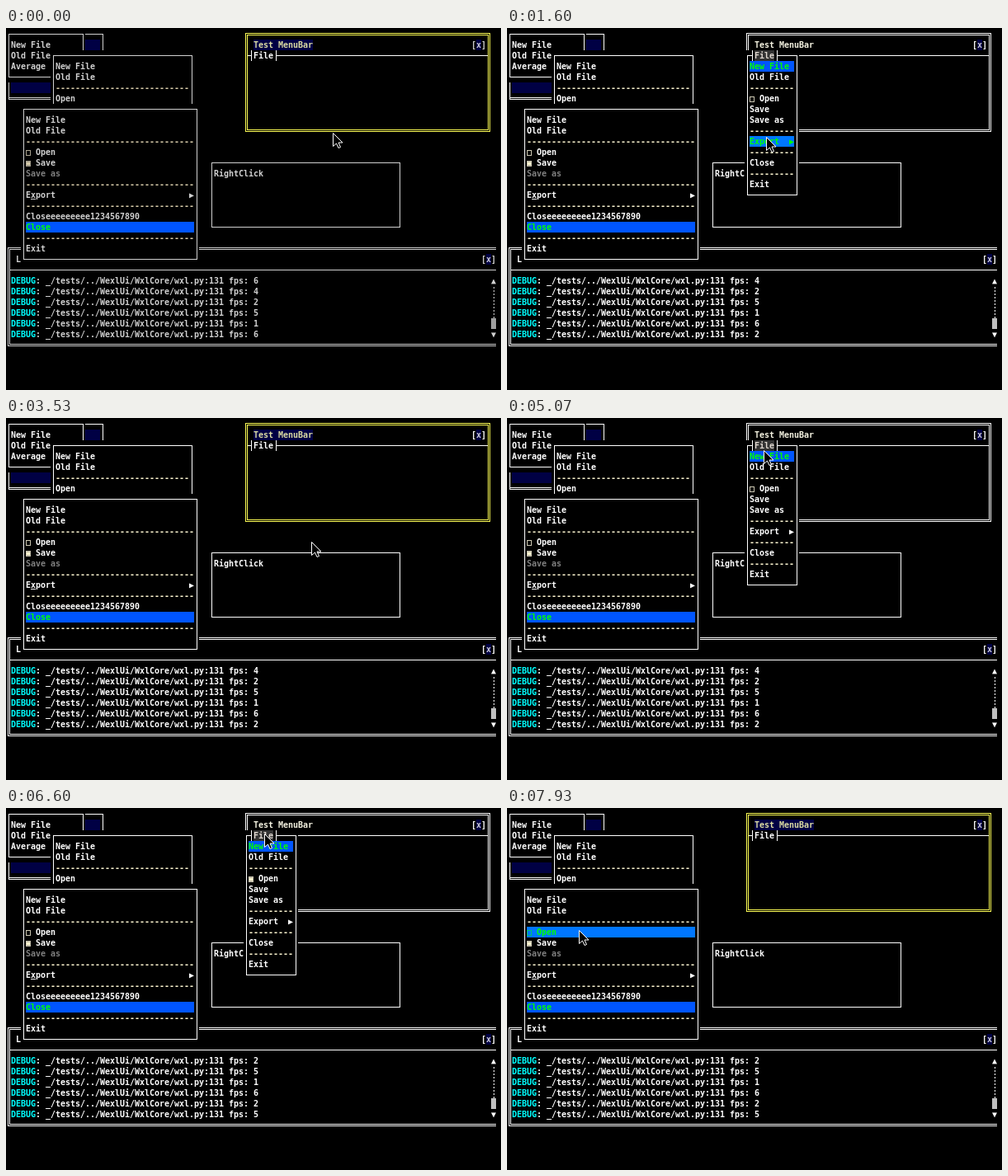
Write an HTML page with a canvas that moves like this. It is 600 by 439 pixels and loops after 8 s.

```html
<!DOCTYPE html>
<html lang="en">
<head>
<meta charset="utf-8">
<title>Terminal menus</title>
<style>
html, body { margin: 0; width: 100%; height: 100%; overflow: hidden; background: #000; }
canvas { display: block; }
</style>
</head>
<body>
<canvas id="stage" width="600" height="439"></canvas>
<script>
(() => {
const ctx = document.getElementById('stage').getContext('2d');
const LOOP = 8000, FPS = 15;
const COL = 6, ROW = 13;
const NAVY = '#000044', YELLOW = '#ffff55', GREEN = '#00ff00';
const SELECTED = '#0055ff', HOVERED = '#0077ff';
const FPS_LOG = [6, 4, 2, 5, 1, 6, 2, 5];

// Pointer stops: time, x, y
const PATH = [
  [0, 396, 127], [140, 396, 127], [870, 313, 33], [1270, 313, 33],
  [1600, 314, 132], [1740, 314, 132], [1800, 322, 136], [2070, 322, 136],
  [2400, 375, 150], [2530, 373, 157], [2670, 373, 157], [2930, 370, 150],
  [3810, 370, 150], [4530, 312, 34], [5005, 312, 34], [5070, 311, 39],
  [5270, 314, 81], [5810, 314, 81], [6070, 314, 48], [6270, 314, 48],
  [6400, 313, 31], [6605, 313, 31], [7000, 309, 82], [7270, 309, 82],
  [7730, 89, 148], [7870, 89, 148], [7930, 87, 148], [8000, 87, 148]
];

// Menu items: '-' is a divider, '>' a submenu, '!' disabled, '&' a shortcut letter
const LEFT_MENU = ['New File', 'Old File', '-', '□ Open', '▣ Save', '!Save as', '-',
  'E&xport>', '-', 'Closeeeeeeeee1234567890', 'Close', '-', 'Exit'];
const fileMenu = checked => ['New File', 'Old File', '-', (checked ? '▣' : '□') + ' Open',
  'Save', 'Save as', '-', 'Export>', '-', 'Close', '-', 'Exit'];
const SUB_MENU = ['t&xt>', '&json', '&yaml'];

let ink, dash, pointer;

const rowTop = r => 1 + r * ROW;
const midX = c => c * COL + 3;
const midY = r => r * ROW + 7;

function rect(x, y, w, h, color) {
  ctx.fillStyle = color;
  ctx.fillRect(x, y, w, h);
}
const cells = (c, r, w, h, color) => rect(c * COL, rowTop(r), w * COL, h * ROW, color);
const hLine = (x0, x1, y, color = ink) => rect(x0, y, x1 - x0 + 1, 1, color);
const vLine = (x, y0, y1, color = ink) => rect(x, y0, 1, y1 - y0 + 1, color);

function text(str, c, r, color = ink) {
  ctx.fillStyle = color;
  [...str].forEach((ch, i) => {
    if (ch !== ' ') ctx.fillText(ch, (c + i) * COL, rowTop(r) + 10);
  });
}

function frame(x0, y0, x1, y1, color = ink) {
  hLine(x0, x1, y0, color);
  hLine(x0, x1, y1, color);
  vLine(x0, y0, y1, color);
  vLine(x1, y0, y1, color);
}

function box(c0, r0, c1, r1, color = ink, double = false) {
  cells(c0, r0, c1 - c0 + 1, r1 - r0 + 1, '#000');
  const [x0, y0, x1, y1] = [midX(c0), midY(r0), midX(c1), midY(r1)];
  if (!double) return frame(x0, y0, x1, y1, color);
  frame(x0 - 1, y0 - 1, x1 + 1, y1 + 1, color);
  frame(x0 + 1, y0 + 1, x1 - 1, y1 - 1, color);
}

function closeButton(c, r) {
  text('[ ]', c, r);
  cells(c + 1, r, 1, 1, NAVY);
  text('x', c + 1, r, '#c8c8d8');
}

function pointerOver(c, r, w) {
  const x = pointer.x - c * COL, y = pointer.y - rowTop(r);
  return x >= 0 && x < w * COL && y >= 0 && y < ROW;
}

function menu(c0, r0, c1, items, selected, canHover = true) {
  box(c0, r0, c1, r0 + items.length + 1);
  const c = c0 + 1, w = c1 - c0 - 1;
  items.forEach((item, i) => {
    const r = r0 + 1 + i;
    if (item === '-') return text('-'.repeat(w), c, r, dash);
    const disabled = item[0] === '!';
    const key = item.indexOf('&');
    const label = item.replace(/[!&>]/g, '');
    const hover = canHover && !disabled && pointerOver(c, r, w);
    const lit = hover || i === selected;
    if (lit) cells(c, r, w, 1, i === selected ? SELECTED : HOVERED);
    const color = disabled ? '#808080' : lit ? GREEN : ink;
    text(label, c, r, color);
    if (/^[□▣]/.test(label) && !lit) text(label[0], c, r, dash);
    if (item.endsWith('>')) text('▶', c1 - 1, r, color);
    if (key >= 0) {
      cells(c + key, r, 1, 1, '#000');
      text(label[key], c + key, r);
      hLine((c + key) * COL, (c + key) * COL + 5, rowTop(r) + 11);
    }
  });
}

function backWindows() {
  box(0, 0, 19, 6);
  cells(1, 1, 18, 1, NAVY);
  cells(1, 5, 18, 1, NAVY);
  hLine(3, 117, 84);
  hLine(3, 117, 86);
  rect(4, 85, 113, 1, '#000');

  box(0, 0, 15, 4);
  ['New File', 'Old File', 'Average'].forEach((s, i) => text(s, 1, 1 + i));

  box(9, 2, 37, 9);
  text('New File', 10, 3);
  text('Old File', 10, 4);
  text('-'.repeat(27), 10, 5, dash);
  text('Open', 10, 6);
}

function logWindow(scroll) {
  box(0, 20, 102, 29, ink, true);
  text('L', 2, 21);
  closeButton(96, 21);
  hLine(4, 600, midY(22));
  for (let i = 0; i < 6; i++) {
    text('DEBUG', 1, 23 + i, '#00ffff');
    text(': _/tests/../WexlUi/WxlCore/wxl.py:131 fps: ' + FPS_LOG[scroll + i], 6, 23 + i);
  }
  text('▲', 98, 23);
  for (let y = 314; y < 352; y += 4) rect(591, y, 1, 2, ink);
  cells(98, 27, 1, 1, ink === '#ffffff' ? '#c0c0c0' : '#a0a0a0');
  text('▼', 98, 28);
}

function barWindow(open) {
  box(48, 0, 97, 9, open ? ink : YELLOW, true);
  if (!open) cells(50, 1, 12, 1, NAVY);
  text('Test MenuBar', 50, 1, open ? '#f6f4e2' : '#dedea4');
  closeButton(94, 1);
  hLine(293, 583, midY(2), '#ffffff');
}

function fileTab(open) {
  const hover = pointerOver(49, 2, 6);
  const color = !open && hover ? '#ffffb4' : '#ffffff';
  rect(297, rowTop(2), 31, ROW, '#000');
  if (open) cells(50, 2, 4, 1, '#333333');
  text('File', 50, 2, open ? '#e0d8d0' : color);
  for (const c of [49, 54]) vLine(midX(c), rowTop(2), rowTop(3) - 1, color);
}

function pointerAt(t) {
  const i = Math.max(1, PATH.findIndex(p => p[0] > t));
  const [t0, x0, y0] = PATH[i - 1], [t1, x1, y1] = PATH[i];
  const k = (t - t0) / (t1 - t0), e = k * k * (3 - 2 * k);
  return { x: Math.round(x0 + (x1 - x0) * e), y: Math.round(y0 + (y1 - y0) * e) };
}

function drawPointer() {
  ctx.save();
  ctx.translate(pointer.x + .5, pointer.y + .5);
  const arrow = new Path2D('M0 0V16L4 12.5L6.5 18L9 17L6.5 11.5H11.5Z');
  ctx.fillStyle = '#000';
  ctx.strokeStyle = '#fff';
  ctx.fill(arrow);
  ctx.stroke(arrow);
  ctx.restore();
}

function draw(now) {
  const t = Math.floor((now % LOOP + 4) * FPS / 1000) * 1000 / FPS % LOOP + 4;
  const within = (a, b) => t >= a && t < b;
  const open = within(1130, 3530) || within(4730, 5730) || within(6600, 7330);
  const subOpen = within(2070, 3530);
  const bright = t >= 1070;
  ink = bright ? '#ffffff' : '#d0d0d0';
  dash = bright ? '#fff6d0' : '#d8ccaa';
  pointer = pointerAt(t);

  rect(0, 0, 600, 439, '#000');
  ctx.font = 'bold 10px "DejaVu Sans Mono", monospace';
  ctx.save();
  ctx.beginPath();
  ctx.rect(0, 0, 594, 439);
  ctx.clip();
  backWindows();
  box(41, 12, 79, 18);
  text('RightClick', 42, 13);
  logWindow((t >= 800) + (t >= 6330));
  menu(3, 7, 38, LEFT_MENU, 10);
  barWindow(open);
  if (open) menu(48, 2, 58, fileMenu(t >= 5730), subOpen ? 7 : 0);
  fileTab(open);
  if (subOpen) menu(58, 9, 64, SUB_MENU, 0, t >= 2730);
  ctx.restore();
  drawPointer();
}

const start = performance.now();
function tick() {
  draw(performance.now() - start);
  requestAnimationFrame(tick);
}
tick();
})();
</script>
</body>
</html>
```
